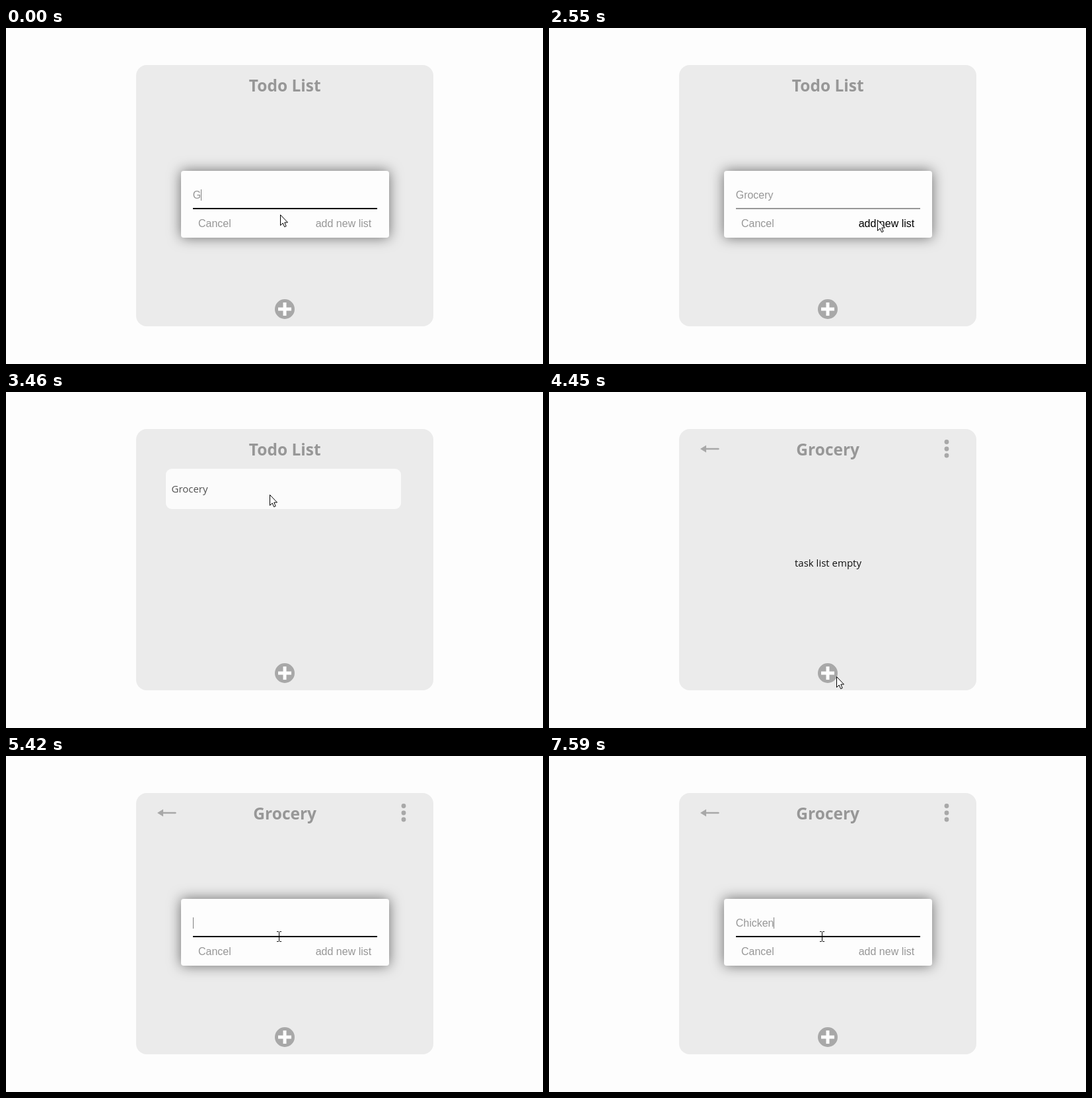
Recreate the animation shown at these times as an HTML page. Size 813x508 px, loop 8000 ms.

```html
<!DOCTYPE html>
<html lang="en">
<head>
<meta charset="utf-8">
<title>Todo List</title>
<style>
  html, body { margin: 0; width: 100%; height: 100%; overflow: hidden; background: #fdfdfd; }
  #stage { position: relative; width: 813px; height: 508px; overflow: hidden; }
  svg { position: absolute; left: 0; top: 0; }
  #shadow {
    position: absolute; left: 265px; top: 216px; width: 315px; height: 101px;
    border-radius: 4px; background: #fdfdfd; box-shadow: 0 0 20px rgba(0, 0, 0, .55);
  }
  .ui { font: 15px "Open Sans", "Noto Sans", sans-serif; }
  .title { font-size: 24.5px; font-weight: 700; fill: #979797; }
  .mid { text-anchor: middle; }
  .form { font: 16px "Liberation Sans", Arial, sans-serif; fill: #979797; }
  .icon { fill: #a8a8a8; }
</style>
</head>
<body>
<div id="stage">
  <svg width="813" height="508">
    <rect x="197" y="56" width="450" height="395" rx="16" fill="#ebebeb"/>
    <text id="title" class="ui title mid" x="422.2" y="96"></text>
    <g id="item">
      <rect x="242" y="116" width="356" height="61" rx="9" fill="#fbfbfb"/>
      <text class="ui" x="250.5" y="152" fill="#505050">Grocery</text>
    </g>
    <g id="tasks">
      <path class="icon" d="M229 86L238 80.5V84.8H256.5a1.2 1.2 0 0 1 0 2.4H238V91.5Z"/>
      <g class="icon">
        <circle cx="602" cy="75.5" r="3.4"/>
        <circle cx="602" cy="86" r="3.4"/>
        <circle cx="602" cy="96" r="3.4"/>
      </g>
      <text class="ui mid" x="422.5" y="264" fill="#111">task list empty</text>
    </g>
    <circle class="icon" cx="422" cy="425" r="15"/>
    <path d="M412 425H432M422 415V435" stroke="#fdfdfd" stroke-width="5"/>
  </svg>
  <div id="dialog">
    <div id="shadow"></div>
    <svg class="form" width="813" height="508">
      <text id="input" x="282.7" y="258"></text>
      <rect id="caret" y="244" width="1" height="17" fill="#808080"/>
      <rect id="line" x="283" y="272" width="279" height="2"/>
      <text x="291" y="301">Cancel</text>
      <text id="add" x="468.7" y="301">add new list</text>
    </svg>
  </div>
  <svg width="813" height="508">
    <path id="arrow" d="M.5 .5V16.5L4.2 13L6.7 18.7L9.2 17.6L6.8 12H11.5Z" fill="#fff" stroke="#000"/>
    <path id="beam" d="M410 265.5h2.5l1 1l1-1h2.5M413.5 266.5v13M410 280.5h2.5l1-1l1 1h2.5" fill="none" stroke="#000"/>
  </svg>
</div>
<script>
const LOOP = 8000, STEP = 120, BLINK = 500;
const SUBMIT = 2550, LISTED = 2700, OPENED = 3710, ADDING = 4700, FOCUS = 5420;
const GREY = '#979797', BLACK = '#000';

const $ = id => document.getElementById(id);
const show = (id, on) => { $(id).style.display = on ? '' : 'none'; };

// Even keystrokes: `first` letters appear at `from`, the last one at `to`
const words = [
  { text: 'Grocery', first: 2, from: 660, to: 1550, focus: 0 },
  { text: 'Chicken', first: 1, from: 6170, to: 7590, focus: FOCUS }
];

// The pointer eases to each stop in equal steps, on a path bent by `bow`
const home = { x: 415, y: 282 };
const stops = [
  { x: 497, y: 290, end: SUBMIT, steps: 5, bow: 16 },
  { x: 399, y: 155, end: 3460, steps: 5, bow: -20 },
  { x: 435, y: 430, end: 4450, steps: 5, bow: 110 },
  { x: 413, y: 273, end: FOCUS, steps: 7, bow: 0 }
];

function typed({ text, first, from, to, focus }, t) {
  if (t < from) return { text: text.slice(0, first - 1), key: focus };
  const gap = (to - from) / (text.length - first);
  const n = Math.min(Math.floor((t - from) / gap + 1e-6), text.length - first);
  return { text: text.slice(0, first + n), key: from + n * gap };
}

function pointer(t) {
  let { x, y } = home;
  for (const stop of stops) {
    const k = Math.floor((t - stop.end) / STEP) + stop.steps;
    if (k < 1) break;
    const u = Math.min(k / stop.steps, 1);
    const p = 1 - (1 - u) ** 2;
    x += (stop.x - x) * p;
    y += (stop.y - y) * p + stop.bow * Math.sin(Math.PI * p);
  }
  return { x: Math.round(x), y: Math.round(y) };
}

function draw(t) {
  const opened = t >= OPENED;
  const focused = t < SUBMIT || t >= FOCUS;
  const { x, y } = pointer(t);

  $('title').textContent = opened ? 'Grocery' : 'Todo List';
  show('item', t >= LISTED && !opened);
  show('tasks', opened);
  show('dialog', t < LISTED || t >= ADDING);

  const { text, key } = typed(words[opened ? 1 : 0], t);
  const input = $('input');
  input.textContent = text;
  show('caret', focused && (t - key) % (2 * BLINK) < BLINK);
  $('caret').setAttribute('x', 283 + Math.floor(text && input.getComputedTextLength()));
  $('line').setAttribute('fill', focused ? BLACK : GREY);
  $('add').setAttribute('fill', x >= 469 && y > 282 && y < 308 ? BLACK : GREY);

  $('arrow').setAttribute('transform', `translate(${x} ${y})`);
  show('arrow', t < FOCUS);
  show('beam', t >= FOCUS);
}

const start = performance.now();
function tick() {
  draw((performance.now() - start) % LOOP);
  requestAnimationFrame(tick);
}
tick();
</script>
</body>
</html>
```
